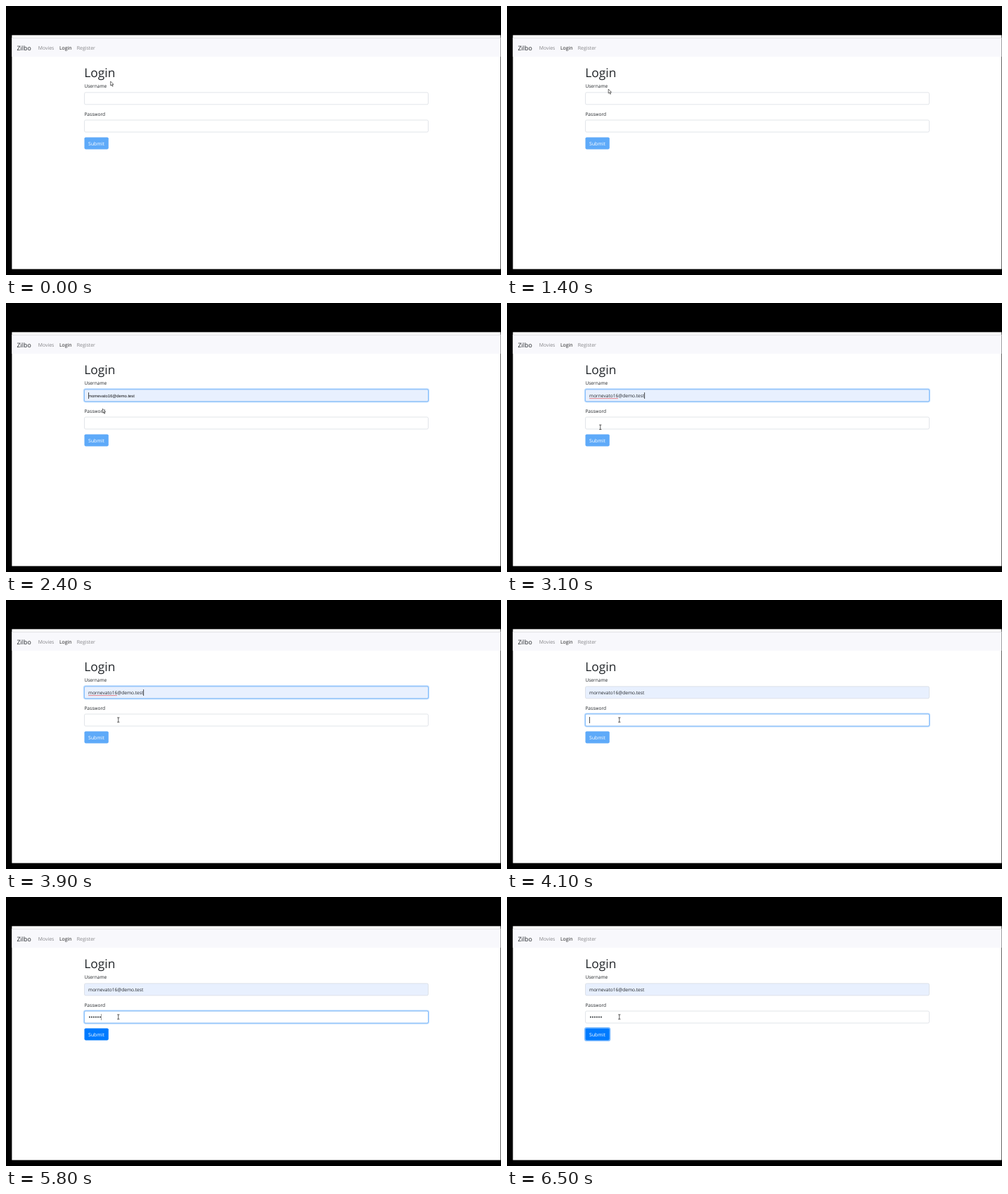
An HTML page with a canvas for the animation above (8000 ms loop, 704 px wide and 382 px high).

```html
<!DOCTYPE html>
<html lang="en">
<head>
<meta charset="utf-8">
<title>Login form</title>
<style>
  html, body { margin: 0; width: 100%; height: 100%; overflow: hidden; background: #000; }
  canvas { display: block; }
</style>
</head>
<body>
<canvas width="704" height="382"></canvas>
<script>
const ctx = document.querySelector('canvas').getContext('2d');
const LOOP = 8000, STEP = 100;
const SANS = '"Open Sans", "Noto Sans", sans-serif';
const ARIAL = '"Liberation Sans", sans-serif';
const INK = '#212529';
const USER = 'mornevato16', EMAIL = USER + '@demo.test';
const FIELD = { x: 111.5, w: 489, h: 17 };
const USER_Y = 122.8, PASS_Y = 162;
const KEY_TIMES = [4700, 4900, 5100, 5300, 5600, 5800];

// Pointer hot spot: time, x, y
const POINTER = [
  [0, 148.7, 107], [1300, 148.7, 107], [1400, 144.2, 118], [1600, 145, 136],
  [2100, 145, 136], [2400, 137.3, 150], [2900, 137.3, 150], [3200, 130.5, 189.5],
  [3500, 130.5, 189.5], [3900, 159.8, 170.2], [LOOP, 159.8, 170.2]
];

const ramp = (t, start, length = 150) => Math.min(1, Math.max(0, (t - start) / length));
const within = (t, from, to) => t >= from && t < to;

function text(str, x, y, size, color = INK, family = SANS, weight = 400) {
  ctx.font = `${weight} ${size}px ${family}`;
  ctx.fillStyle = color;
  ctx.fillText(str, x, y);
  return ctx.measureText(str).width;
}

function box(x, y, w, h, r, fill, stroke, lineWidth = 0.6) {
  ctx.beginPath();
  ctx.roundRect(x, y, w, h, r);
  if (fill) { ctx.fillStyle = fill; ctx.fill(); }
  if (stroke) { ctx.strokeStyle = stroke; ctx.lineWidth = lineWidth; ctx.stroke(); }
}

function ring(x, y, w, h, amount) {
  if (amount) box(x - 0.7, y - 0.7, w + 1.4, h + 1.4, 2.4, null, `rgba(0,123,255,${0.3 * amount})`, 1.5);
}

function field(y, fill, focus) {
  const { x, w, h } = FIELD;
  box(x, y, w, h, 1.8, fill, '#ced4da');
  ring(x, y, w, h, focus);
  if (focus) box(x, y, w, h, 1.8, null, `rgba(128,189,255,${focus})`, 0.8);
}

function caret(x, y, color = '#222') {
  ctx.fillStyle = color;
  ctx.fillRect(x, y, 0.8, 9);
}

function squiggle(x, y, width) {
  ctx.beginPath();
  for (let i = 0; i <= width; i++) ctx.lineTo(x + i, y + (i % 2 ? 0.3 : -0.3));
  ctx.strokeStyle = '#e0575c';
  ctx.lineWidth = 0.7;
  ctx.stroke();
}

function pointerAt(t) {
  const i = POINTER.findIndex(p => p[0] > t);
  const [t0, x0, y0] = POINTER[i - 1], [t1, x1, y1] = POINTER[i];
  const k = (t - t0) / (t1 - t0);
  return [x0 + (x1 - x0) * k, y0 + (y1 - y0) * k];
}

function drawPointer(t) {
  const [x, y] = pointerAt(t);
  const overField = [USER_Y, PASS_Y].some(top => y > top && y < top + FIELD.h);
  ctx.save();
  ctx.translate(x, y);
  if (overField) {
    ctx.strokeStyle = '#333';
    ctx.lineWidth = 0.8;
    ctx.stroke(new Path2D('M-1.6-3.2H1.6M0-3.2V3.2M-1.6 3.2H1.6'));
  } else {
    const arrow = new Path2D('M0 0V6L1.4 4.8 2.5 7.2 3.5 6.7 2.4 4.4H4.3Z');
    ctx.fillStyle = '#fff';
    ctx.strokeStyle = '#333';
    ctx.lineWidth = 0.7;
    ctx.fill(arrow);
    ctx.stroke(arrow);
  }
  ctx.restore();
}

function drawPage() {
  ctx.fillStyle = '#000';
  ctx.fillRect(0, 0, 704, 382);
  ctx.fillStyle = '#fff';
  ctx.fillRect(8.4, 41.4, 695, 332.2);
  ctx.fillStyle = '#f8f8fc';
  ctx.fillRect(8.4, 45, 695, 27);
  ctx.fillStyle = '#dedee2';
  ctx.fillRect(8.4, 45, 695, 0.8);

  text('Zilbo', 15.6, 63, 8.8);
  text('Movies', 45.8, 62, 6.9, '#858588');
  text('Login', 76, 62, 6.9, '#222');
  text('Register', 100.8, 62, 6.9, '#858588');
  text('Login', 111.2, 100.8, 17.4, INK, SANS, 500);
  text('Username', 111.4, 116.4, 6.6);
  text('Password', 111.4, 155.7, 6.6);
}

function drawUsername(t) {
  const focus = ramp(t, 1750) * (1 - ramp(t, 3950));
  field(USER_Y, t >= 2300 ? '#e8f0fe' : '#fff', focus);
  if (t >= 2800) {
    const width = text(EMAIL, 117, 134, 6.6);
    if (t < 4000) squiggle(117, 135.6, ctx.measureText(USER).width);
    if (within(t, 2800, 3200) || within(t, 3700, 4000)) caret(117 + width, 127);
  } else {
    if (t >= 2300) text(EMAIL, 117, 134.2, 5.87, '#111', ARIAL);
    if (t >= 1800) caret(117.1, 127);
  }
}

function drawPassword(t) {
  field(PASS_Y, '#fff', ramp(t, 3950) * (1 - ramp(t, 6270)));
  const typed = KEY_TIMES.filter(k => t >= k).length;
  ctx.fillStyle = INK;
  for (let i = 0; i < typed; i++) {
    ctx.beginPath();
    ctx.arc(118.9 + 3 * i, 170.5, 0.95, 0, 7);
    ctx.fill();
  }
  if (within(t, 4000, 4400)) caret(117.2, 166);
  if (typed && t < 6300) caret(117.1 + 3 * typed, 166, '#888');
}

function drawButton(t) {
  const focus = ramp(t, 6270);
  ring(111.5, 186.4, 34.3, 17, focus * 1.8);
  box(111.5, 186.4, 34.3, 17, 1.8, t >= 4700 ? '#007bff' : '#5eaaf9');
  text('Submit', 117.1, 197.7, 6.9, '#fff');
}

function draw(t) {
  drawPage();
  drawUsername(t);
  drawPassword(t);
  drawButton(t);
  drawPointer(t);
}

ctx.textRendering = 'geometricPrecision';
const start = performance.now();
function tick() {
  const t = (performance.now() - start) % LOOP;
  draw(Math.floor(t / STEP) * STEP);
  requestAnimationFrame(tick);
}
tick();
</script>
</body>
</html>
```
